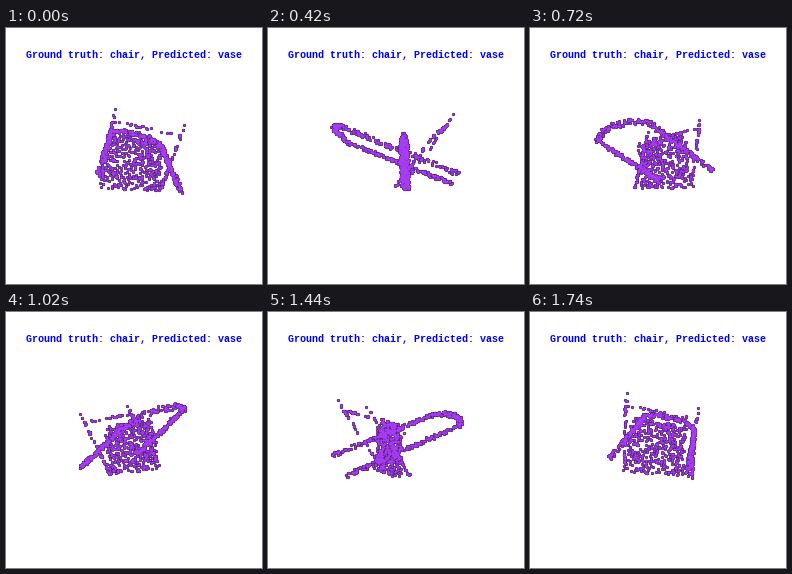
Animation of 256x256 px, one loop 1800 ms. Source, as a matplotlib script:

```python
import numpy as np
import matplotlib.pyplot as plt
from matplotlib.animation import FuncAnimation

SIZE, DPI, FRAMES, INTERVAL = 256, 64, 30, 60
PT = 72 / DPI          # points per pixel
EYE = 350              # camera distance in pixels
CENTER = 128
rng = np.random.default_rng(7)


def path(points, n, spread):
    """Random points along a polyline, with thickness."""
    points = np.array(points, float)
    length = np.r_[0, np.cumsum(np.linalg.norm(np.diff(points, axis=0), axis=1))]
    s = rng.uniform(0, length[-1], n)
    line = np.column_stack([np.interp(s, length, c) for c in points.T])
    return line + rng.uniform(-spread, spread, (n, 3))


def panel(a, b, c, d, n, depth):
    """Random points on the quad a-b-c-d, thick along the view axis."""
    s, t = rng.uniform(0, 1, (2, n, 1))
    a, b, c, d = (np.array(p, float) for p in (a, b, c, d))
    quad = (1 - t) * ((1 - s) * a + s * b) + t * ((1 - s) * d + s * c)
    quad[:, 1] += rng.uniform(-depth, depth, n)
    return quad


def mix(a, b, t):
    return tuple(np.array(a) * (1 - t) + np.array(b) * t)


# (right, towards the viewer, up) in pixels around the turning axis
back_l, back_r = (-27, -50, 28), (30, -54, 14)
foot_l, foot_r = (-30, 60, -16), (39, 60, -31)
tip_l, tip_r = (-15, 59, 43), (45, 42, 30)
base_l, base_r = (-33, 8, -28), (27, -4, -33)
seat = (-25, 10, 21), (28, 4, 11), (26, 7, -36), (-33, 12, -30)
hip_l, hip_r = mix(back_l, foot_l, .5), mix(back_r, foot_r, .5)

cloud = np.vstack([
    panel(*seat, 430, 4),
    path(seat[:2], 50, 2.5),
    path([back_l, hip_l], 85, 2),
    path([back_r, hip_r], 85, 2),
    path([hip_l, foot_l], 65, 2),
    path([hip_r, foot_r], 75, 2),
    path([back_l, (-12, -60, 29), (4, -63, 26), (20, -61, 20), back_r], 110, 2.5),
    path([tip_l, base_l], 42, .8),
    path([tip_r, base_r], 50, .8),
    path([mix(tip_l, base_l, .18), mix(tip_r, base_r, .18)], 22, 1),
])


def project(angle):
    x, y, z = cloud.T
    c, s = np.cos(angle), np.sin(angle)
    scale = EYE / (EYE - (y * c - x * s))
    return CENTER + (x * c + y * s) * scale, CENTER - z * scale


fig = plt.figure(figsize=(SIZE / DPI, SIZE / DPI), dpi=DPI, facecolor="white")
ax = fig.add_axes([0, 0, 1, 1])
ax.set(xlim=(0, SIZE), ylim=(SIZE, 0))
ax.axis("off")

ax.text(128, 29.5, "Ground truth: chair, Predicted: vase", color="#0000ff",
        family="Liberation Mono", weight="bold", size=10 * PT,
        ha="center", va="baseline")


def dots(color, px, z):
    return ax.plot([], [], "o", color=color, ms=px * PT, mew=0,
                   antialiased=False, zorder=z)[0]


layers = [dots("#2a0f3c", 3.2, 2), dots("#a83cf5", 2.1, 3)]


def update(i):
    x, y = project(2 * np.pi * i / FRAMES)
    for layer in layers:
        layer.set_data(x, y)
    return layers


anim = FuncAnimation(fig, update, frames=FRAMES, interval=INTERVAL,
                     repeat=True, repeat_delay=0)
plt.show()
```
